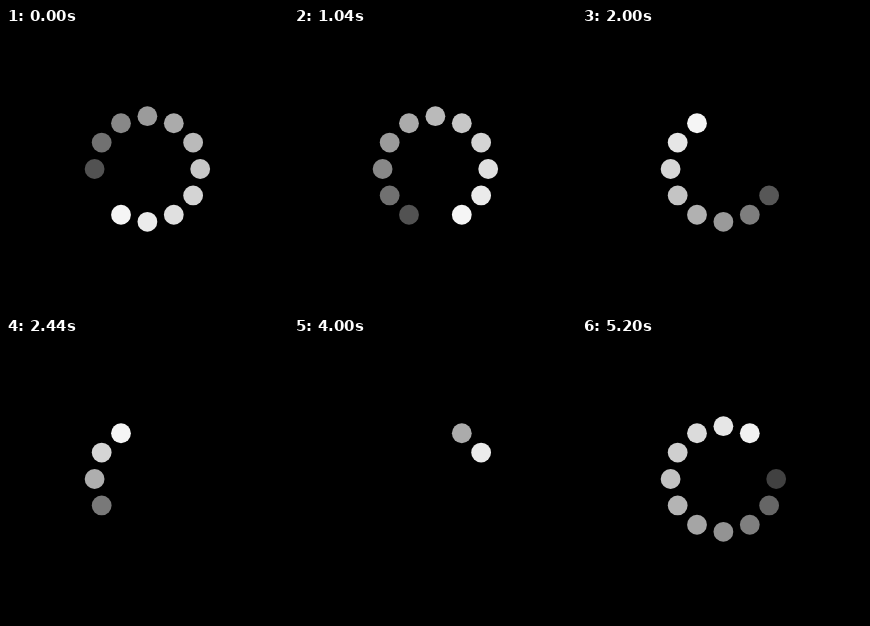
Write an HTML page that moves like this. It is 282x282 px and loops after 5240 ms.

```html
<!DOCTYPE html>
<html lang="en">
<head>
<meta charset="utf-8">
<title>Loading ring</title>
<style>
  html, body { margin: 0; width: 100%; height: 100%; overflow: hidden; background: #000; }
  svg { display: block; width: 100%; height: 100%; }
</style>
</head>
<body>
<svg id="ring" viewBox="0 0 282 282"></svg>
<script>
  const LOOP = 5240;
  const COUNT = 12;
  const STEP = 2.5;        // ticks between neighbouring dots
  const TICKS_PER_MS = 0.024;
  const RESTART = 68;      // tick at which the ring is empty
  const ring = document.getElementById('ring');

  const dots = Array.from({ length: COUNT }, (_, i) => {
    const angle = i * 2 * Math.PI / COUNT;
    const dot = document.createElementNS('http://www.w3.org/2000/svg', 'circle');
    dot.setAttribute('cx', 141.4 + 52.8 * Math.sin(angle));
    dot.setAttribute('cy', 141 - 52.8 * Math.cos(angle));
    dot.setAttribute('r', 9.9);
    return ring.appendChild(dot);
  });

  // Head and tail of the arc, counted in dots clockwise from the top.
  function arcAt(tick) {
    if (tick < RESTART) {
      return { head: Math.min(7 + tick / STEP, 23), tail: (tick - 10) / STEP };
    }
    const head = (tick - 90.5) / STEP;
    return { head, tail: Math.max(0, head - 11) };
  }

  function draw(ms) {
    const tick = Math.floor(ms * TICKS_PER_MS + 0.05);
    const { head, tail } = arcAt(tick);
    dots.forEach(dot => dot.setAttribute('visibility', 'hidden'));
    for (let i = Math.floor(tail) + 1; i <= head; i++) {
      const part = (i - tail) / (head - tail);
      const grey = Math.round(245 * Math.pow(part, 1 / 2.2));
      const dot = dots[(i + COUNT) % COUNT];
      dot.setAttribute('fill', `rgb(${grey},${grey},${grey})`);
      dot.setAttribute('visibility', 'visible');
    }
  }

  const start = performance.now();
  function loop() {
    draw((performance.now() - start) % LOOP);
    requestAnimationFrame(loop);
  }
  loop();
</script>
</body>
</html>
```
